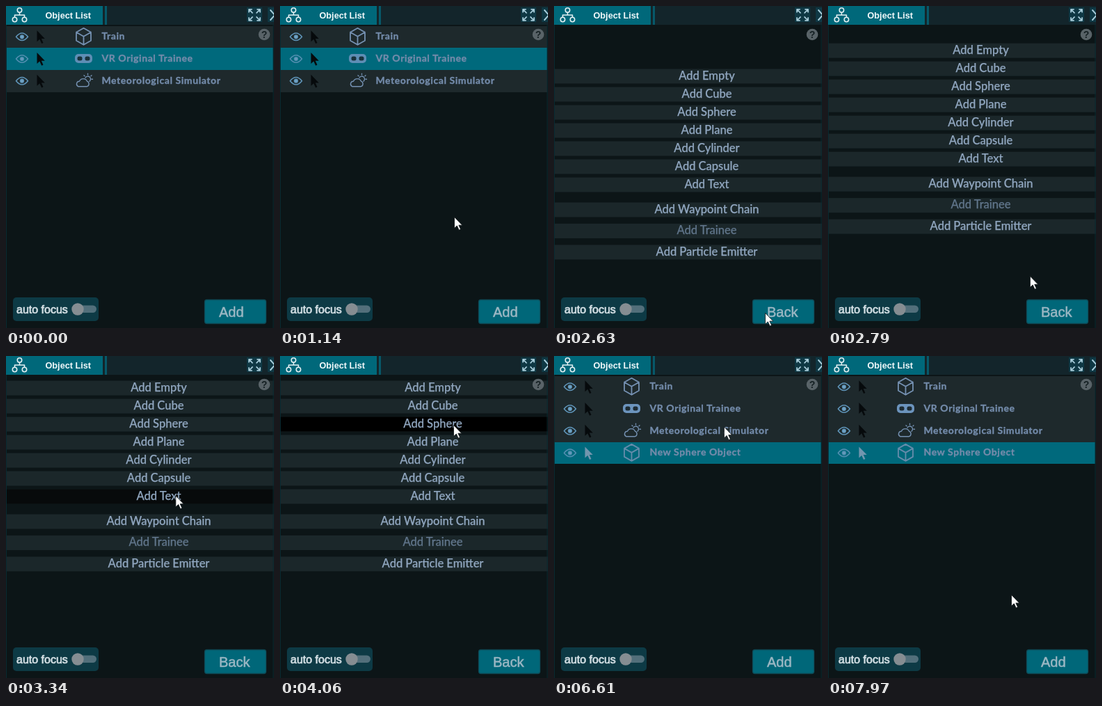
Recreate the animation shown at these times as an HTML page. Size 385 by 463 pixels, loop 8 s.

```html
<!DOCTYPE html>
<html lang="en">
<head>
<meta charset="utf-8">
<title>Object list</title>
<style>
  html, body { margin: 0; width: 100%; height: 100%; overflow: hidden; background: #0c1517; }
  svg { display: block; width: 100vw; height: 100vh; }
  text { font-family: "Liberation Sans", Arial, sans-serif; }
  .item { font: 700 14px Lato, sans-serif; letter-spacing: .58px; fill: #738baa; stroke: #738baa; stroke-width: .35; }
  .option { font: 500 16.5px Lato, sans-serif; fill: #91a7c0; stroke: #91a7c0; stroke-width: .25; text-anchor: middle; }
  .off { fill: #60758a; stroke: #60758a; }
  .line { fill: none; stroke-linecap: round; stroke-linejoin: round; }
  .row { shape-rendering: crispEdges; }
</style>
</head>
<body>
<svg viewBox="0 0 385 463" preserveAspectRatio="none">
  <defs>
    <path id="arrow" d="M0 0V16L3.8 12.5 6.7 18.7 9 17.6 6.3 11.7H11.3Z"/>
    <g id="eye" class="line" stroke="#5f94b8" stroke-width="1.6">
      <path d="M-8.5 0Q0-10.5 8.5 0Q0 10.5-8.5 0Z"/>
      <circle r="2.3" fill="#78a9ca"/>
    </g>
    <path id="cube" class="line" stroke="#7591b2" stroke-width="1.8"
      d="M0-12L10.5-6V6L0 12-10.5 6V-6ZM-10.5-6L0 0 10.5-6M0 0V12"/>
    <g id="goggles">
      <rect x="-12.5" y="-6.5" width="25" height="13" rx="5" fill="#6c94bd"/>
      <g fill="#1d2b33">
        <rect x="-9" y="-3" width="7" height="6" rx="2.5"/>
        <rect x="2" y="-3" width="7" height="6" rx="2.5"/>
      </g>
    </g>
    <g id="weather" class="line" stroke="#7591b2" stroke-width="1.4">
      <path d="M-8 8.5H5A4 4 0 0 0 5 1A6 6 0 0 0-6 1A4 4 0 0 0-8 8.5Z"/>
      <path d="M2.500-4A4 4 0 1 1 8.500 1M6-10V-8.500M11.500-7.500L10.500-6.500M13-2H11.500M.5-7.500L1.500-6.500"/>
    </g>
    <path id="arm" class="line" stroke="#a5cad8" stroke-width="1.8" d="M-8-4V-8H-4M-7.500-7.500L-3-3"/>
  </defs>

  <rect width="385" height="463" fill="#0c1517"/>
  <g id="list"></g>
  <g id="menu"></g>

  <rect width="385" height="27" fill="#13252b"/>
  <rect width="139" height="27" fill="#00687a"/>
  <rect x="142" width="3" height="27" fill="#07596a"/>
  <g class="line" stroke="#e4eff2" stroke-width="1.6">
    <circle cx="19.5" cy="6" r="3.2"/>
    <circle cx="12.5" cy="19.5" r="3.2"/>
    <circle cx="26.5" cy="19.5" r="3.2"/>
    <path d="M19.5 9.5V13M12.5 16V13H26.5V16"/>
  </g>
  <text x="56.5" y="18" font-size="12.7" font-weight="700" fill="#f2f8fa">Object List</text>
  <rect x="346" y="2" width="22" height="21" fill="#0f3844"/>
  <g id="expand" transform="translate(357 12.8)"></g>
  <rect x="376" y="2" width="9" height="21" fill="#0f3844"/>
  <path class="line" d="M380 6L386 13 380 20" stroke="#a5cad8" stroke-width="2"/>

  <circle cx="371" cy="41" r="8.3" fill="#596368"/>
  <text x="371" y="46" font-size="14" font-weight="700" fill="#152023" text-anchor="middle">?</text>

  <rect x="10" y="419" width="123" height="34" rx="5" fill="#0d3a45"/>
  <text x="15" y="442" font-size="16" fill="#d3dfe4" stroke="#d3dfe4" stroke-width=".7">auto focus</text>
  <rect x="96" y="430.5" width="34" height="10.5" rx="5.2" fill="#526f7b"/>
  <circle cx="103" cy="436" r="8.7" fill="#858d92"/>

  <rect id="button" x="285.5" y="422.5" width="88" height="34" rx="3" fill="#006779" stroke="#0d4d5a" stroke-width="1.3"/>
  <text id="label" x="306" y="446.5" font-size="20" fill="#9bb7c3" stroke="#9bb7c3" stroke-width=".5">Add</text>

  <path d="M.5 27V463M384 27V463" stroke="#092a31"/>
  <use id="pointer" href="#arrow" fill="#fff" stroke="#101618" stroke-width=".8"/>
</svg>
<script>
const LOOP = 8000;
const MENU_IN = 2560, MENU_OUT = 4600;
const PITCH = 31.7;
const $ = id => document.getElementById(id);
const ramp = (t, from, to) => Math.max(0, Math.min(1, (t - from) / (to - from)));
const show = (id, on) => $(id).style.display = on ? "" : "none";

const items = [
  ["Train", "cube"],
  ["VR Original Trainee", "goggles"],
  ["Meteorological Simulator", "weather"],
  ["New Sphere Object", "cube"]
];

const options = ["Empty", "Cube", "Sphere", "Plane", "Cylinder", "Capsule", "Text",
  "Waypoint Chain", "Trainee", "Particle Emitter"];
const optionY = i => i < 7 ? 45 + 26 * i : 237 + 30.5 * (i - 7);

// Pointer strokes: start, end, x, y, sag
const moves = [
  [530, 1140, 250, 303],
  [1310, 1670, 262, 316],
  [1830, 2450, 303, 441],
  [2680, 3450, 240, 187],
  [3500, 3780, 254, 43],
  [3780, 4060, 249, 99],
  [4420, 4700, 244, 101],
  [6610, 7410, 184, 335],
  [7460, 7970, 263, 343, 17]
];

function pointerAt(t) {
  let x = 338, y = 466;
  for (const [from, to, endX, endY, sag = 0] of moves) {
    const u = ramp(t, from, to), eased = 1 - (1 - u) ** 1.5;
    x += (endX - x) * eased;
    y += (endY - y) * eased;
    if (u < 1) return [x, y + sag * Math.sin(Math.PI * u)];
  }
  return [x, y];
}

$("list").innerHTML = items.map(([name, icon], i) => {
  const y = 43.8 + i * PITCH;
  const bar = `class="row" x="1" y="${y - 15.3}" width="382.5" height="${PITCH}"`;
  return `<g id="item${i}">
    <rect ${bar} fill="#1e292c"/>
    <rect ${bar} id="pick${i}" fill="#00697c"/>
    <g id="icons${i}">
      <use href="#eye" x="23" y="${y + .5}"/>
      <use href="#${icon}" x="111.5" y="${y}"/>
    </g>
    <use href="#arrow" x="44.5" y="${y - 8.5}" fill="${i === 3 ? "#7296ae" : "#060a0c"}"/>
    <text class="item" x="137.5" y="${y + 4.5}">${name}</text>
  </g>`;
}).join("");

$("menu").innerHTML = options.map((name, i) => {
  const y = optionY(i);
  const bar = `x="1" y="${y - 9.5}" width="384" height="21"`;
  return `<rect ${bar} fill="#1b272a"/>
    <rect ${bar} id="hover${i}"/>
    <text class="option${name === "Trainee" ? " off" : ""}" x="219.5" y="${y + 5.5}">Add ${name}</text>`;
}).join("");

$("expand").innerHTML = [0, 90, 180, 270]
  .map(a => `<use href="#arm" transform="rotate(${a})"/>`).join("");

const menuShift = t => 55 * Math.exp(-Math.max(0, t - 2680) / 100);

// Share of the last 80 ms the pointer spent on a row: a linear hover fade
function hover(i, t) {
  let hits = 0;
  for (let k = 0; k < 8; k++) {
    const past = t - k * 10;
    const d = pointerAt(past)[1] - menuShift(past) - optionY(i);
    if (past >= MENU_IN && d >= -9.5 && d < 11.5) hits++;
  }
  return hits / 8;
}

function select(i, amount) {
  $("pick" + i).setAttribute("opacity", amount);
  $("icons" + i).setAttribute("opacity", 1 - .12 * amount);
}

function draw(t) {
  const open = t >= MENU_IN && t < MENU_OUT;
  show("list", !open);
  show("menu", open);
  show("item3", t >= MENU_OUT);
  $("label").textContent = open ? "Back" : "Add";

  select(0, 0);
  select(1, 1 - ramp(t, 1310, 1450));
  select(2, 0);
  select(3, ramp(t, MENU_OUT - 60, MENU_OUT + 200));

  if (open) {
    $("menu").setAttribute("transform", `translate(0 ${menuShift(t)})`);
    options.forEach((name, i) =>
      $("hover" + i).setAttribute("opacity", name === "Trainee" ? 0 : hover(i, t)));
  }

  const press = ramp(t, 2430, 2500) - ramp(t, 2540, 2620);
  $("button").setAttribute("fill-opacity", 1 - .25 * press);
  const [x, y] = pointerAt(t);
  $("pointer").setAttribute("transform", `translate(${x + .5} ${y + .5})`);
}

const start = performance.now();
function tick() {
  draw((performance.now() - start) % LOOP);
  requestAnimationFrame(tick);
}
tick();
</script>
</body>
</html>
```
